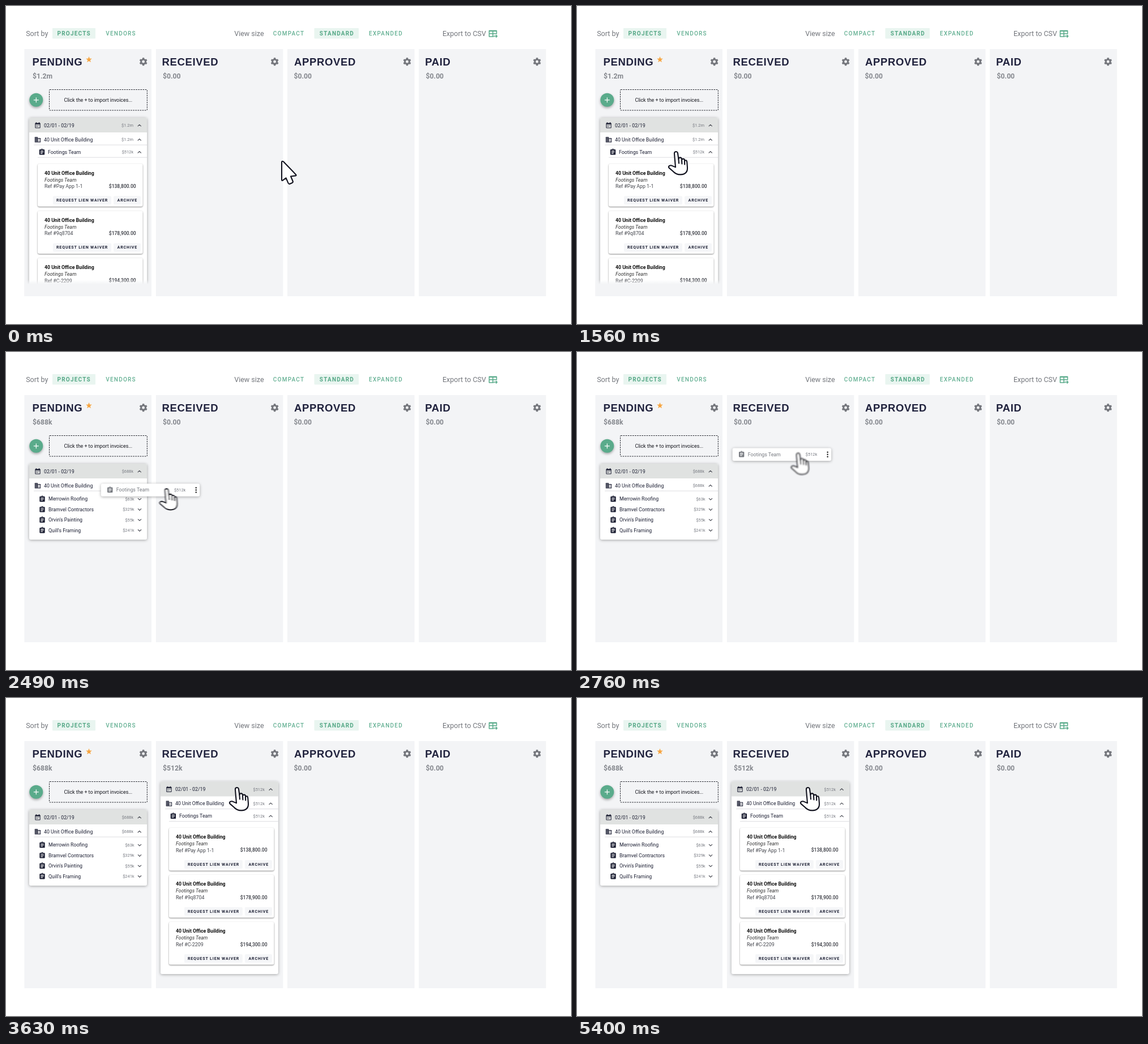
An HTML page for the animation above (5.43 s loop, 998 by 561 pixels).

```html
<!DOCTYPE html>
<html lang="en">
<head>
<meta charset="utf-8">
<title>Invoice board</title>
<style>
html, body { margin: 0; width: 100%; height: 100%; overflow: hidden; background: #fff; }
svg { display: block; width: 998px; height: 561px; }
text { font: 8.8px Roboto, sans-serif; fill: #1c1f33; white-space: pre; }
.label { font-size: 12.5px; fill: #73767c; }
.tab { font-size: 10px; font-weight: 500; letter-spacing: 1.25px; fill: #64b093; }
.on { font-weight: 700; letter-spacing: 1.2px; fill: #55a886; }
.title { font: bold 18.5px "Liberation Sans", Arial, sans-serif; letter-spacing: .65px; fill: #20223d; }
.total { font-size: 12.2px; font-weight: 700; fill: #85888e; }
.sum { font-size: 7.4px; fill: #777a82; text-anchor: end; }
.bold { font-weight: 700; font-size: 8.7px; fill: #111; }
.ital { font-style: italic; fill: #333; }
.ref { fill: #44464d; }
.price { font-size: 8.5px; font-weight: 500; fill: #33353d; text-anchor: end; }
.btn { font-size: 7px; font-weight: 700; letter-spacing: .9px; }
.hint { font-size: 8.85px; fill: #15161d; text-anchor: middle; }
.soft { fill: #777a80; }
.panel { filter: drop-shadow(0 1px 2.5px #0005); }
.card { filter: drop-shadow(0 1px 1px #0007); }
.line { fill: none; stroke-linecap: round; stroke-linejoin: round; }
.cursor { fill: #fff; stroke: #12131f; stroke-width: 2.1; stroke-linejoin: round; stroke-linecap: round; }
</style>
</head>
<body>
<svg id="stage" viewBox="0 0 998 561"></svg>
<script>
const LOOP = 5430, GREEN = '#5aab8b', INK = '#1c1f33', COLUMN = '#f3f4f6';
const CREW = 'Footings Team', PROJECT = '40 Unit Office Building';

const ICONS = {
  calendar: 'M19 4h-1V2h-2v2H8V2H6v2H5a2 2 0 0 0-2 2v14a2 2 0 0 0 2 2h14a2 2 0 0 0 2-2V6a2 2 0 0 0-2-2zM5 9h14v11H5zM7 11h2v2H7zm4 0h2v2h-2zm4 0h2v2h-2zM7 15h2v2H7zm4 0h2v2h-2z',
  building: 'M2 3h10v4h10v14H2z' + [5, 9, 13, 17].map(y => `M4 ${y}h2v2h-2zm4 0h2v2h-2z`).join('') +
    'M12 9h8v10h-8v-2h2v-2h-2v-2h2v-2h-2zM16 11h2v2h-2zm0 4h2v2h-2z',
  clipboard: 'M5 3h4a3 3 0 0 1 6 0h4a2 2 0 0 1 2 2v14a2 2 0 0 1-2 2H5a2 2 0 0 1-2-2V5a2 2 0 0 1 2-2zM7 7h10v2H7zm0 4h10v2H7zm0 4h7v2H7zM11 3a1 1 0 0 0 2 0a1 1 0 0 0-2 0z'
};

const text = (x, y, s, cls = '', extra = '') => `<text x="${x}" y="${y}" class="${cls}" ${extra}>${s}</text>`;
const rect = (x, y, w, h, fill, r = 0, extra = '') =>
  `<rect x="${x}" y="${y}" width="${w}" height="${h}" rx="${r}" fill="${fill}" ${extra}/>`;
const path = (d, stroke, width) => `<path class="line" d="${d}" stroke="${stroke}" stroke-width="${width}"/>`;
const group = (id, body, extra = '') => `<g id="${id}" ${extra}>${body}</g>`;
const icon = (name, x, y, fill = INK) =>
  `<path d="${ICONS[name]}" fill="${fill}" fill-rule="evenodd" transform="translate(${x} ${y}) scale(.52) translate(-12 -12)"/>`;
const chevron = (x, y, dir) => path(`M${x - 2.7} ${y + dir * 1.3}l2.7 ${-dir * 2.6}l2.7 ${dir * 2.6}`, '#44464f', 1.1);

function gear(x, y) {
  const teeth = [0, 60, 120, 180, 240, 300].map(a =>
    `<path d="M-2.1-4L-1.5-7h3L2.1-4z" transform="rotate(${a})"/>`).join('');
  return `<g transform="translate(${x} ${y})" fill="#75777d">${teeth}<circle r="3.9" fill="none" stroke="#75777d" stroke-width="3"/></g>`;
}

function star(x, y, r) {
  const pts = Array.from({ length: 10 }, (_, i) => {
    const a = i * Math.PI / 5, q = i % 2 ? r * .42 : r;
    return [x + q * Math.sin(a), y - q * Math.cos(a)];
  });
  return `<polygon points="${pts}" fill="#f7a540"/>`;
}

function column(x, name, titleX, gearX) {
  return rect(x, 76, 224.6, 436, COLUMN) + text(titleX, 105.2, name, 'title') + gear(gearX, 98.2);
}

function panelHead(sum, height) {
  return rect(41, 197, 208, height, '#fff', 3, 'class="panel"') +
    '<path d="M41 223V200a3 3 0 0 1 3-3H246a3 3 0 0 1 3 3V223z" fill="#e0e2e1"/>' +
    icon('calendar', 56, 210.3) + text(67, 213.5, '02/01 - 02/19') +
    text(225, 213, sum, 'sum') + chevron(235.7, 210.6, 1) +
    icon('building', 56, 235.7) + text(67, 238.8, PROJECT) +
    text(225, 238.2, sum, 'sum') + chevron(235.7, 235.8, 1) +
    rect(49, 244.6, 200, 1, '#dcdde0');
}

function invoice(y, ref, price) {
  return rect(56, y, 185.5, 75.5, '#fff', 3, 'class="card"') +
    text(68, y + 19.4, PROJECT, 'bold') + text(68, y + 31.2, CREW, 'ital') +
    text(68, y + 43, 'Ref #' + ref, 'ref') + text(229.6, y + 42.6, price, 'price') +
    rect(83, y + 57, 103, 15, '#f5f6f8', 2) + text(89, y + 67, 'REQUEST LIEN WAIVER', 'btn') +
    rect(190, y + 57, 48, 15, '#f5f6f8', 2) + text(196.6, y + 67, 'ARCHIVE', 'btn');
}

function openPanel(sum) {
  return panelHead(sum, 339.5) + icon('clipboard', 63.5, 257.8) + text(74, 260.8, CREW) +
    text(225, 260.2, '$512k', 'sum') + chevron(235.7, 257.8, 1) + rect(56, 266.6, 193, 1, '#dcdde0') +
    invoice(278.3, 'Pay App 1-1', '$138,800.00') +
    invoice(361.4, '9q8704', '$178,900.00') +
    invoice(444.5, 'C-2209', '$194,300.00');
}

function closedPanel() {
  const rows = [['Merrowin Roofing', '$63k'], ['Bramvel Contractors', '$329k'],
    ["Orvin's Painting", '$55k'], ["Quill's Framing", '$241k']];
  return panelHead('$688k', 134) + rows.map(([name, sum], i) => {
    const y = 259.2 + i * 18.4;
    return icon('clipboard', 64, y + .3) + text(75, y + 3.1, name) +
      text(226.6, y + 2.6, sum, 'sum') + chevron(236, y + .4, -1);
  }).join('');
}

function toolbar() {
  return text(35.2, 52.6, 'Sort by', 'label') + rect(82, 39, 76, 18.6, '#e9f5f0', 1) +
    text(90.6, 52.4, 'PROJECTS', 'tab on') + text(176.2, 52.4, 'VENDORS', 'tab') +
    text(403.2, 52.6, 'View size', 'label') + text(471.8, 52.4, 'COMPACT', 'tab') +
    rect(544.5, 39, 78.5, 18.6, '#e9f5f0', 1) + text(553.8, 52.4, 'STANDARD', 'tab on') +
    text(641, 52.4, 'EXPANDED', 'tab') + text(771, 53.4, 'Export to CSV', 'label') +
    path('M861 54H853.5V43.5H866.5V49M853.5 44.3H866.5M853.5 48.8H866.5M860 44V54', GREEN, 1.6) +
    path('M862 53.3H867.6M865.6 51.3l2 2l-2 2', GREEN, 1.4);
}

const dragCard = rect(0, 0, 174.5, 22.5, '#fff', 3, 'class="panel"') +
  icon('clipboard', 16, 11.2, '#777a80') + text(27, 14.2, CREW, 'soft') +
  text(149.6, 13.8, '$512k', 'sum') +
  [7.2, 11.2, 15.2].map(y => `<circle cx="168" cy="${y}" r="1.25" fill="#222"/>`).join('');

const arrow = '<path d="M0 1.8V32.6q0 2 1.8 1L7.6 29.4L11.5 38.4q1 2 3 1.3L18.4 38q2-1 1.2-3L16 26.5L24.4 25.4q2-.4.6-2L3 .4q-3-1.4-3 1.4z"/>';
const hand = '<path d="M-3 4C-3.6-.8 2.4-1.6 3 3L4.4 13C4.6 9.6 9.6 9.4 10 13V15C10.4 11.8 14.6 11.8 15 15V17C15.6 14.6 18.8 14.6 19.2 18L20 28C20.4 36 16 40 8 40.4C2 40.6-2 38.4-5 35L-12.6 28.4C-14.6 26-11 23.4-7.6 24.6L-1 27.4z"/>' +
  '<path d="M4.4 13L5 20.5M10 15L10.4 21.5M15 17L15.2 22.5" fill="none"/>';

const stage = document.getElementById('stage');
stage.innerHTML =
  `<defs><linearGradient id="fade" x2="0" y2="1"><stop stop-color="${COLUMN}" stop-opacity="0"/><stop offset="1" stop-color="${COLUMN}"/></linearGradient>
  <filter id="smear" x="-30%" y="-30%" width="160%" height="160%"><feGaussianBlur id="blur"/></filter></defs>` +
  toolbar() +
  column(32.4, 'PENDING', 46.5, 242.6) + column(264.8, 'RECEIVED', 275.4, 474.6) +
  column(497, 'APPROVED', 509, 708.5) + column(729.2, 'PAID', 740.2, 938) +
  star(146.5, 94.6, 5.6) +
  text(47, 127.6, '$1.2m', 'total', 'id="oldSum"') + text(47, 127.6, '$688k', 'total', 'id="newSum"') +
  text(277, 127.6, '$0.00', 'total', 'id="noneIn"') + text(277, 127.6, '$512k', 'total', 'id="someIn"') +
  text(508.4, 127.6, '$0.00', 'total') + text(741.6, 127.6, '$0.00', 'total') +
  `<circle cx="53.3" cy="165.8" r="12" fill="${GREEN}" style="filter:drop-shadow(0 2px 2px #0005)"/>` +
  path('M49.3 165.8h8M53.3 161.8v8', '#fff', 1.2) +
  rect(76.5, 147.5, 172.8, 36.5, 'none', 1, 'stroke="#22242c" stroke-dasharray="2.6 1.5"') +
  text(162.8, 168.8, 'Click the + to import invoices...', 'hint') +
  group('open', openPanel('$1.2m') + rect(32.4, 483, 224.6, 8, 'url(#fade)') + rect(32.4, 491, 224.6, 21, COLUMN) + rect(32.4, 512, 224.6, 40, '#fff')) +
  group('closed', closedPanel()) +
  group('received', openPanel('$512k'), 'transform="translate(231.9 -49.4)"') +
  group('drag', dragCard) +
  group('pointer', group('arrow', arrow) + group('hand', hand), 'class="cursor"');

const $ = Object.fromEntries([...stage.querySelectorAll('[id]')].map(e => [e.id, e]));
const ramp = (t, a, b) => Math.min(1, Math.max(0, (t - a) / (b - a)));
const ease = p => p * p * (3 - 2 * p);
const show = (el, v) => { el.style.opacity = v; el.style.display = v > 0 ? '' : 'none'; };

// Pointer position: a low arc to the row, then a drag to the next column.
function pointer(t) {
  if (t < 1800) {
    const s = ease(ramp(t, 630, 1500)), r = 1 - s;
    return [487 - 312 * s, r * r * 274 + 2 * r * s * 307 + s * s * 257];
  }
  const s = ease(ramp(t, 2128, 2881)), r = 1 - s;
  return [175 + 233 * s, r ** 3 * 257 + 3 * r * r * s * 235 + 3 * r * s * s * 265 + s ** 3 * 158];
}

function draw(t) {
  const [x, y] = pointer(t), [px, py] = pointer(t - 10);
  const smear = d => Math.min(1.3, Math.abs(d) * .5);
  const sx = smear(x - px), sy = smear(y - py);
  $.pointer.setAttribute('transform', `translate(${x} ${y})`);
  $.blur.setAttribute('stdDeviation', `${sx} ${sy}`);
  if (sx > .03) $.pointer.setAttribute('filter', 'url(#smear)');
  else $.pointer.removeAttribute('filter');
  show($.arrow, t < 1440 ? 1 : 0);
  show($.hand, t < 1440 ? 0 : 1);

  // The hand shrinks a little while it holds the card.
  const press = ramp(t, 1900, 2000) * (1 - ramp(t, 2880, 2980));
  $.hand.setAttribute('transform', `translate(${-1.5 * press} ${.6 * press}) scale(${1 - .08 * press})`);

  show($.open, 1 - ramp(t, 2010, 2150));
  show($.closed, ramp(t, 2160, 2285));
  show($.oldSum, 1 - ramp(t, 2130, 2250));
  show($.newSum, ramp(t, 2130, 2250));

  $.drag.setAttribute('transform', `translate(${x - 117.5} ${y - 8.5})`);
  show($.drag, ramp(t, 2030, 2120) * (1 - ramp(t, 2880, 2970)));
  const drop = ramp(t, 2880, 3120);
  show($.received, drop);
  show($.noneIn, 1 - drop);
  show($.someIn, drop);
}

function tick() {
  draw(performance.now() % LOOP);
  requestAnimationFrame(tick);
}
tick();
</script>
</body>
</html>
```
